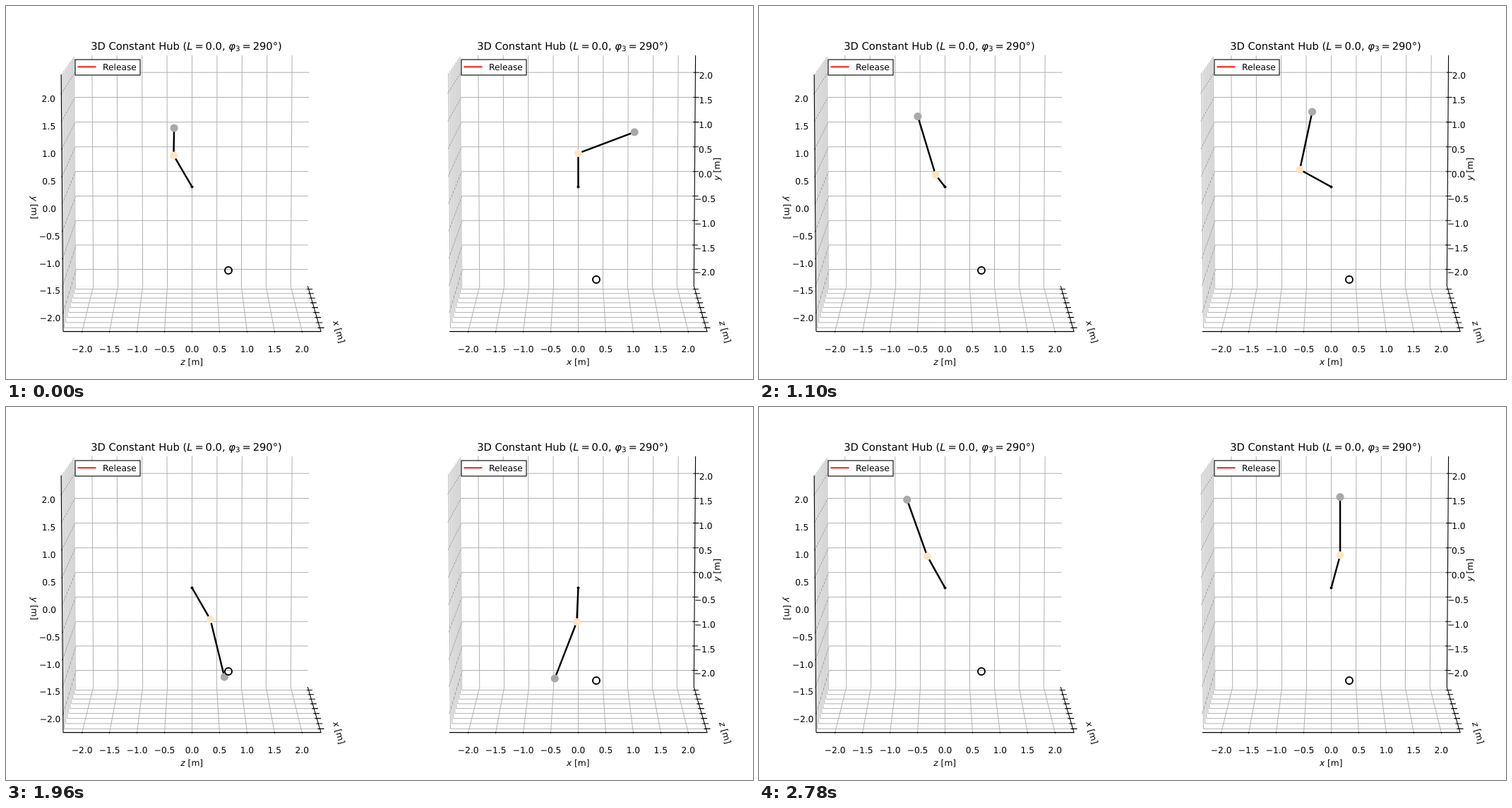
An HTML page for the animation above (2800 ms loop, 1058x529 px).

```html
<!DOCTYPE html>
<html lang="en">
<head>
<meta charset="utf-8">
<title>3D Constant Hub</title>
<style>
  html, body { margin: 0; width: 100%; height: 100%; overflow: hidden; background: #fff; }
  svg { display: block; width: 1058px; height: 529px; font: 12.25px "DejaVu Sans", sans-serif; }
  text { text-anchor: middle; fill: #000; white-space: pre; text-rendering: geometricPrecision; }
  path { fill: none; }
  .title { font-size: 14.7px; }
  .math { font-style: oblique; }
  .sub { font-size: 10.3px; }
  .grid { stroke: #b0b0b0; stroke-width: .98; }
  .edge { stroke: #f4f4f4; stroke-width: .98; }
  .axis { stroke: #000; stroke-width: 1.1; }
  .arm { stroke: #000; stroke-width: 2.45; stroke-linejoin: round; stroke-linecap: square; }
</style>
</head>
<body>
<svg id="stage" viewBox="0 0 1058 529"></svg>
<script>
const LOOP = 2800, STEP = 20;
const RAD = Math.PI / 180;
const EYE = 42.6, SCALE = 74.2, MID_Y = 256.5, EDGE = 2.344;
const COS = Math.cos(7.6 * RAD), SIN = Math.sin(7.6 * RAD);
const UPPER = 0.7, LOWER = 1.154, TILT = 30 * RAD;
const ticks = Array.from({ length: 9 }, (_, i) => i / 2 - 2);
const stage = document.getElementById('stage');

function add(tag, attrs, content = '') {
  const node = document.createElementNS('http://www.w3.org/2000/svg', tag);
  for (const name in attrs) node.setAttribute(name, attrs[name]);
  node.innerHTML = content;
  return stage.appendChild(node);
}

// Perspective camera: h to the right, v up, d towards the viewer.
function project(midX, [h, v, d]) {
  const zoom = SCALE * EYE / (EYE - d * COS - v * SIN);
  return [midX + h * zoom, MID_Y - (v * COS - d * SIN) * zoom];
}

const pathOf = points => 'M' + points.map(p => p.map(n => n.toFixed(2)).join(' ')).join('L');

function label(x, y, content, attrs = {}) {
  return add('text', { x, y: y + 4.5, ...attrs }, content);
}

function turnedLabel(x, y, angle, content) {
  label(0, 0, content, { transform: `translate(${x} ${y}) rotate(${angle})` });
}

const unit = name => `<tspan class="math">${name}</tspan> [m]`;
const number = n => n.toFixed(1).replace('-', '\u2212');

function buildPanel({ midX, across, depth, upOnRight, ring }) {
  const E = EDGE;
  const at = (...p) => project(midX, p);
  const lines = (cls, segments) => add('path', {
    class: cls,
    d: segments.map(s => pathOf(s.map(p => at(...p)))).join('')
  });

  lines('edge', [[[-E, -E, -E], [E, -E, -E]]]);
  lines('grid', ticks.flatMap(t => [
    [[t, -E, E], [t, -E, -E], [t, E, -E]],
    [[-E, t, E], [-E, t, -E], [E, t, -E]],
    [[-E, E, t], [-E, -E, t], [E, -E, t]]
  ]));

  const inner = E - .039, outer = E + .078;
  const upright = upOnRight
    ? [[E, -E, -E], [E, E, -E]]
    : [[-E, -E, E], [-E, E, E]];
  lines('axis', [upright, [[-E, -E, E], [E, -E, E], [E, -E, -E]]]);
  lines('axis', ticks.flatMap(t => [
    [[inner, -E, t], [outer, -E, t]],
    [[t, -E, inner], [t, -E, outer]],
    upOnRight
      ? [[inner, t, -E], [outer, t, -E]]
      : [[-E, t, inner], [-E, t, outer]]
  ]));

  for (const t of ticks) {
    label(at(t, -E, E)[0], 486.5, number(t));
    const [x, y] = upOnRight ? at(E, t, -E) : at(-E, t, E);
    if (upOnRight) label(x + 15, y + 4.2, number(t));
    else label(x - 18.2, y + 7, number(t));
  }
  label(midX - .3, 504.5, unit(across));
  turnedLabel(midX + 208.3, 462, 74, unit(depth));
  if (upOnRight) turnedLabel(1006, 231.3, -90, unit('y'));
  else turnedLabel(40, 286, 90, unit('y'));

  add('text', { x: midX - 8, y: 61.7, class: 'title' },
    '3D Constant Hub (<tspan class="math">L</tspan><tspan dx="2.9">=</tspan>' +
    '<tspan dx="2.9">0.0</tspan>, <tspan class="math">φ</tspan>' +
    '<tspan class="sub" dy="2.4">3</tspan><tspan dx="2.9" dy="-2.4">=</tspan>' +
    '<tspan dx="2.9">290°</tspan>)');

  const arm = add('path', { class: 'arm' });
  add('circle', { cx: midX, cy: MID_Y, r: 2 });
  const elbow = add('circle', { r: 5.4, fill: '#ffe4c4' });
  const ball = add('circle', { r: 5.6, fill: '#a9a9a9' });
  add('circle', { cx: ring[0], cy: ring[1], r: 5, fill: 'none', stroke: '#000', 'stroke-width': 2 });

  const left = midX - 165.5;
  add('rect', { x: left, y: 76, width: 92, height: 22, fill: '#fff', stroke: '#000', 'stroke-width': 1.1 });
  add('path', { d: `M${left + 3.5} 86.3h26`, stroke: '#f00', 'stroke-width': 1.84 });
  label(left + 39, 86.3, 'Release', { style: 'text-anchor:start' });

  return (elbowPoint, ballPoint) => {
    const a = at(...elbowPoint), b = at(...ballPoint);
    arm.setAttribute('d', pathOf([[midX, MID_Y], a, b]));
    for (const [dot, [x, y]] of [[elbow, a], [ball, b]]) {
      dot.setAttribute('cx', x);
      dot.setAttribute('cy', y);
    }
  };
}

// Smooth curve through [seconds, value] pairs.
function curve(keys) {
  const last = keys.length - 1;
  const chord = i => (keys[i + 1][1] - keys[i][1]) / (keys[i + 1][0] - keys[i][0]);
  const slopes = keys.map((key, i) => {
    if (i === 0 || i === last) return 0;
    const before = key[0] - keys[i - 1][0], after = keys[i + 1][0] - key[0];
    return (chord(i - 1) * after + chord(i) * before) / (before + after);
  });
  slopes[0] = 2 * chord(0) - slopes[1];
  slopes[last] = 2 * chord(last - 1) - slopes[last - 1];

  return t => {
    let i = 0;
    while (i < last - 1 && t > keys[i + 1][0]) i++;
    const [t0, v0] = keys[i], [t1, v1] = keys[i + 1];
    const span = t1 - t0, u = (t - t0) / span, w = 1 - u;
    return v0 * w * w * (1 + 2 * u) + v1 * u * u * (3 - 2 * u) +
      span * u * w * (slopes[i] * w - slopes[i + 1] * u);
  };
}

// Hub angle is gain * t²; swing and drift steer the outer link.
const gain = curve([[0, 45], [.32, 46.3], [.8, 48.6], [1.4, 48.6], [1.96, 46.25], [2.34, 44.55], [2.78, 44.75]]);
const swing = curve([[0, -69.3], [.32, -64.7], [.54, -54.9], [.8, -37.9], [1.08, -14.5], [1.4, 30],
  [1.62, 70.5], [1.96, 158.3], [2.16, 219], [2.34, 274.3], [2.7, 349], [2.78, 360]]);
const drift = curve([[0, 0], [.32, -.105], [.54, -.18], [.8, -.26], [1.08, -.33], [1.4, -.375],
  [1.62, -.22], [1.96, .265], [2.16, .32], [2.34, .205], [2.7, -.28], [2.78, -.385]]);

function pose(t) {
  const hub = gain(t) * t * t * RAD, link = swing(t) * RAD, dz = drift(t);
  const rise = UPPER * Math.cos(hub), reach = Math.sqrt(LOWER * LOWER - dz * dz);
  const elbow = [-UPPER * Math.sin(hub), rise * Math.cos(TILT), -rise * Math.sin(TILT)];
  const ball = [elbow[0] - reach * Math.sin(link), elbow[1] + reach * Math.cos(link), elbow[2] + dz];
  return [elbow, ball];
}

const sideView = buildPanel({ midX: 263.5, across: 'z', depth: 'x', upOnRight: false, ring: [315, 375] });
const frontView = buildPanel({ midX: 810.5, across: 'x', depth: 'z', upOnRight: true, ring: [836, 388] });

function draw() {
  const ms = Math.floor(performance.now() % LOOP / STEP) * STEP;
  const points = pose(ms / 1000);
  sideView(...points.map(([x, y, z]) => [z, y, -x]));
  frontView(...points);
  requestAnimationFrame(draw);
}
draw();
</script>
</body>
</html>
```
